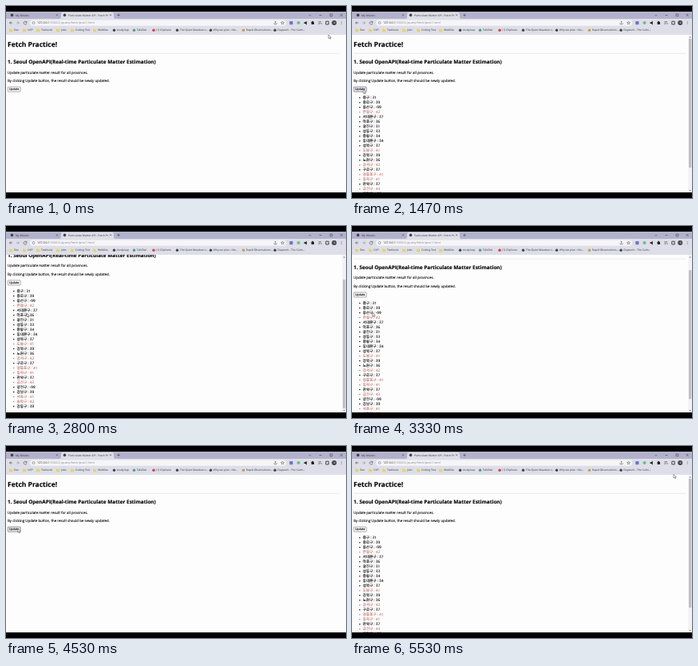
Recreate the animation shown at these times as an HTML page. Size 426 by 240 pixels, loop 5590 ms.

```html
<!DOCTYPE html>
<html lang="en">
<head>
<meta charset="utf-8">
<title>Fetch Practice</title>
<style>
html, body { margin: 0; width: 100%; height: 100%; overflow: hidden; background: #000; }
svg { display: block; width: 100%; height: 100%; }
text { font-family: "Open Sans", "Noto Sans CJK KR", "Noto Sans CJK", sans-serif; text-rendering: geometricPrecision; white-space: pre; }
#page text { stroke-width: .12px; }
</style>
</head>
<body>
<svg id="stage" viewBox="0 0 426 240">
  <defs><clipPath id="view"><rect y="36" width="426" height="197"/></clipPath></defs>
  <rect width="426" height="240"/>
  <rect y="36" width="426" height="197" fill="#fdfdfd"/>
  <g clip-path="url(#view)">
    <g id="page"></g>
    <g id="scrollbar"></g>
  </g>
  <g id="chrome"></g>
  <path id="cursor" d="M0 0V4.6L1.1 3.6L1.9 5.3L2.7 4.9L1.9 3.3H3.4Z" fill="#fff" stroke="#333" stroke-width=".45"/>
</svg>
<script>
const LOOP = 5590, STEP = 1000 / 15, MAX_SCROLL = 33.2;
const byId = id => document.getElementById(id);
const page = byId('page'), chrome = byId('chrome'), scrollbar = byId('scrollbar'), cursor = byId('cursor');

function add(parent, tag, attrs, content) {
  const el = document.createElementNS('http://www.w3.org/2000/svg', tag);
  for (const key in attrs) el.setAttribute(key, attrs[key]);
  if (content) el.textContent = content;
  return parent.appendChild(el);
}
const label = (parent, x, y, size, content, fill = '#111', weight = 400) =>
  add(parent, 'text', { x, y, 'font-size': size, fill, 'font-weight': weight }, content);
const box = (parent, x, y, width, height, fill, rx = 0) =>
  add(parent, 'rect', { x, y, width, height, fill, rx });
const dot = (parent, cx, cy, r, fill) => add(parent, 'circle', { cx, cy, r, fill });
const line = (parent, d, stroke = '#444', width = 0.6) =>
  add(parent, 'path', { d, stroke, 'stroke-width': width, fill: 'none' });

function buildChrome() {
  box(chrome, 0, 7, 426, 9, '#b3b2cc');
  box(chrome, 0, 16, 426, 20, '#dedee8');
  add(chrome, 'path', { d: 'M67 16.2Q69 16 69 14V10Q69 8 71 8H133Q135 8 135 10V14Q135 16 137 16.2Z', fill: '#dedee8' });
  const tabs = [[7.5, 'My Movies', 64], [73.5, 'Particulate Matter API - Fetch Pr', 131]];
  for (const [x, title, close] of tabs) {
    dot(chrome, x, 11.4, 1.8, '#444');
    label(chrome, x + 4.5, 12.5, 3.4, title, '#333');
    line(chrome, `M${close - 1} 10.4l2 2m0 -2l-2 2`);
  }
  line(chrome, 'M139.3 11.4h3.4m-1.7 -1.7v3.4');
  line(chrome, 'M379.5 11l1.3 1.3l1.3 -1.3M392.5 11.5h3M406 10h2.8v2.8h-2.8zM418.8 10l2.8 2.8m0 -2.8l-2.8 2.8');

  line(chrome, 'M8 21H4.5m1.6 -1.7L4.5 21l1.6 1.7');
  line(chrome, 'M13 21h3.5m-1.6 -1.7L16.5 21l-1.6 1.7', '#8c8c9c');
  line(chrome, 'M25.7 20.2a1.9 1.9 0 1 0 .2 1.4m0 -2.6v1.5h-1.5');
  box(chrome, 30, 17.4, 321, 7.4, '#f5f5f8', 3.7);
  add(chrome, 'circle', { cx: 34.5, cy: 21, r: 1.5, fill: 'none', stroke: '#555', 'stroke-width': 0.5 });
  const url = label(chrome, 39, 22.4, 3.75, '127.0.0.1', '#222');
  add(url, 'tspan', { fill: '#85858d' }, ':5500/2-jquery/fetch/prac1.html');
  line(chrome, 'M336 21v2h3v-2m-1.5 1v-3m-1 1l1 -1l1 1', '#555', 0.5);
  line(chrome, 'M346.5 19l.6 1.4h1.5l-1.2 1l.5 1.5l-1.4 -.9l-1.4 .9l.5 -1.5l-1.2 -1h1.5z', '#555', 0.5);
  box(chrome, 355.2, 19, 4.2, 4.2, '#6f72d0', 0.6);
  dot(chrome, 366.5, 21, 2.1, '#68c087');
  add(chrome, 'path', { d: 'M373.5 20.2h1.3l2 -1.4v4.6l-2 -1.4h-1.3z', fill: '#222' });
  box(chrome, 382.6, 19.8, 3.4, 3.2, '#222', 0.4);
  dot(chrome, 384.2, 19.6, 0.9, '#222');
  line(chrome, 'M391.5 19.7h3.6m-3.6 1.4h2.4m-2.4 1.4h1.5M395 21v2');
  line(chrome, 'M400.8 19.2h3.4v3.8h-3.4z', '#222', 0.8);
  dot(chrome, 411.2, 21, 3, '#41444d');
  label(chrome, 410.3, 22.1, 3, '호', '#eee');
  for (const y of [19.4, 21, 22.6]) dot(chrome, 420.2, y, 0.45, '#333');

  const folders = [[4, 'Dev'], [21, 'UXP'], [38, 'Textbook'], [63, 'Jobs'], [81, 'Coding Test'], [109, 'WebDev']];
  for (const [x, name] of folders) {
    add(chrome, 'path', { d: `M${x} 28.4h1.6l.6 .6h2v3.2h-4.2z`, fill: '#e8d266' });
    label(chrome, x + 6, 31.3, 3.4, name, '#333');
  }
  const links = [
    [134, '#444', 'study.kap'], [159, '#4c9c88', 'TalkOwl'], [183.5, '#d93d3d', '(1) ClipVane'],
    [213, '#444', 'The Quiet Meadow o…'], [255, '#444', 'Why we plan : the…'],
    [296, '#c69a4a', 'Rapid Observations…'], [335.5, '#444', 'Daywork - The Calm…']
  ];
  for (const [x, color, name] of links) {
    dot(chrome, x + 1.5, 30.2, 1.7, color);
    label(chrome, x + 4.8, 31.3, 3.4, name, '#333');
  }
}

function pageText(parent, x, y, size, content, fill = '#111', weight = 400) {
  const text = label(parent, x, y, size, content, fill, weight);
  text.setAttribute('stroke', fill);
}

function buildPage() {
  pageText(page, 2, 50.6, 8.5, 'Fetch Practice!', '#000', 700);
  line(page, 'M2 59.3H418', '#e2dde5', 0.7);
  pageText(page, 2, 72.3, 6.4, '1. Seoul OpenAPI(Real-time Particulate Matter Estimation)', '#000', 700);
  pageText(page, 2, 84.5, 4.4, 'Update particulate matter result for all provinces.');
  pageText(page, 2, 94.9, 4.4, 'By clicking Update button, the result should be newly updated.');
  const button = box(page, 2.2, 101, 16, 6.2, '#efefef', 0.8);
  button.setAttribute('stroke-width', 0.5);
  pageText(page, 4, 105.4, 3.6, 'Update');

  const list = add(page, 'g', {});
  const districts = ('중구 31,종로구 39,용산구 -99,은평구 42,서대문구 37,마포구 36,광진구 31,성동구 33,중랑구 34,' +
    '동대문구 34,성북구 37,도봉구 41,강북구 39,노원구 36,강서구 42,구로구 37,영등포구 41,동작구 41,' +
    '관악구 37,금천구 43,양천구 -99,강남구 39,서초구 41,송파구 42,강동구 39').split(',');
  districts.forEach((entry, i) => {
    const [name, value] = entry.split(' ');
    const color = value > 40 ? '#c07a72' : '#111';
    const y = 114.7 + i * 6;
    dot(list, 9.7, y, 0.8, color);
    pageText(list, 13.5, y + 1.6, 4.6, `${name} : ${value}`, color);
  });
  return { button, list };
}

function buildScrollbar() {
  box(scrollbar, 421.3, 36, 4.7, 197, '#f1f1f1');
  add(scrollbar, 'path', { d: 'M422.5 39.4l1.2 -1.4l1.2 1.4zM422.5 230l1.2 1.4l1.2 -1.4z', fill: '#777' });
  return box(scrollbar, 422, 41, 3.4, 161, '#c1c1c1');
}

buildChrome();
const { button, list } = buildPage();
const thumb = buildScrollbar();

// Each key is [time, ...values]; movement eases between neighbours.
function track(keys, t) {
  let i = 0;
  while (i < keys.length - 2 && t >= keys[i + 1][0]) i++;
  const [t0, ...from] = keys[i], [t1, ...to] = keys[i + 1];
  const p = Math.min(1, Math.max(0, (t - t0) / (t1 - t0)));
  const eased = p * p * (3 - 2 * p);
  return from.map((v, k) => v + (to[k] - v) * eased);
}
const pointerKeys = [
  [0, 404, 36], [130, 404, 36], [800, 11, 103.5], [1250, 11, 103.5], [1800, 20, 107], [2300, 26, 109],
  [3300, 26, 109], [3800, 11, 67], [4030, 24, 20], [4160, 24, 20], [4480, 15, 103.5],
  [4870, 15, 103.5], [5460, 403, 35.5], [LOOP, 403, 35.5]
];
const scrollKeys = [[0, 0], [1930, 0], [2500, MAX_SCROLL], [3100, MAX_SCROLL], [3600, 0], [LOOP, 0]];

function render(time) {
  const t = Math.floor((time % LOOP + 5) / STEP) * STEP + 1;
  const [x, y] = track(pointerKeys, t);
  const [scroll] = track(scrollKeys, t);
  const loaded = (t >= 1130 && t < 4130) || t >= 4800;
  const hover = x > 2 && x < 18.2 && y + scroll > 101 && y + scroll < 107.2;

  cursor.setAttribute('transform', `translate(${x} ${y})`);
  page.setAttribute('transform', `translate(0 ${-scroll})`);
  thumb.setAttribute('y', 41 + scroll / MAX_SCROLL * 26);
  list.style.display = scrollbar.style.display = loaded ? '' : 'none';
  button.setAttribute('fill', hover ? '#e2e2e6' : '#efefef');
  button.setAttribute('stroke', hover ? '#444b58' : '#777');
}

const start = performance.now();
function tick() {
  render(performance.now() - start);
  requestAnimationFrame(tick);
}
tick();
</script>
</body>
</html>
```
